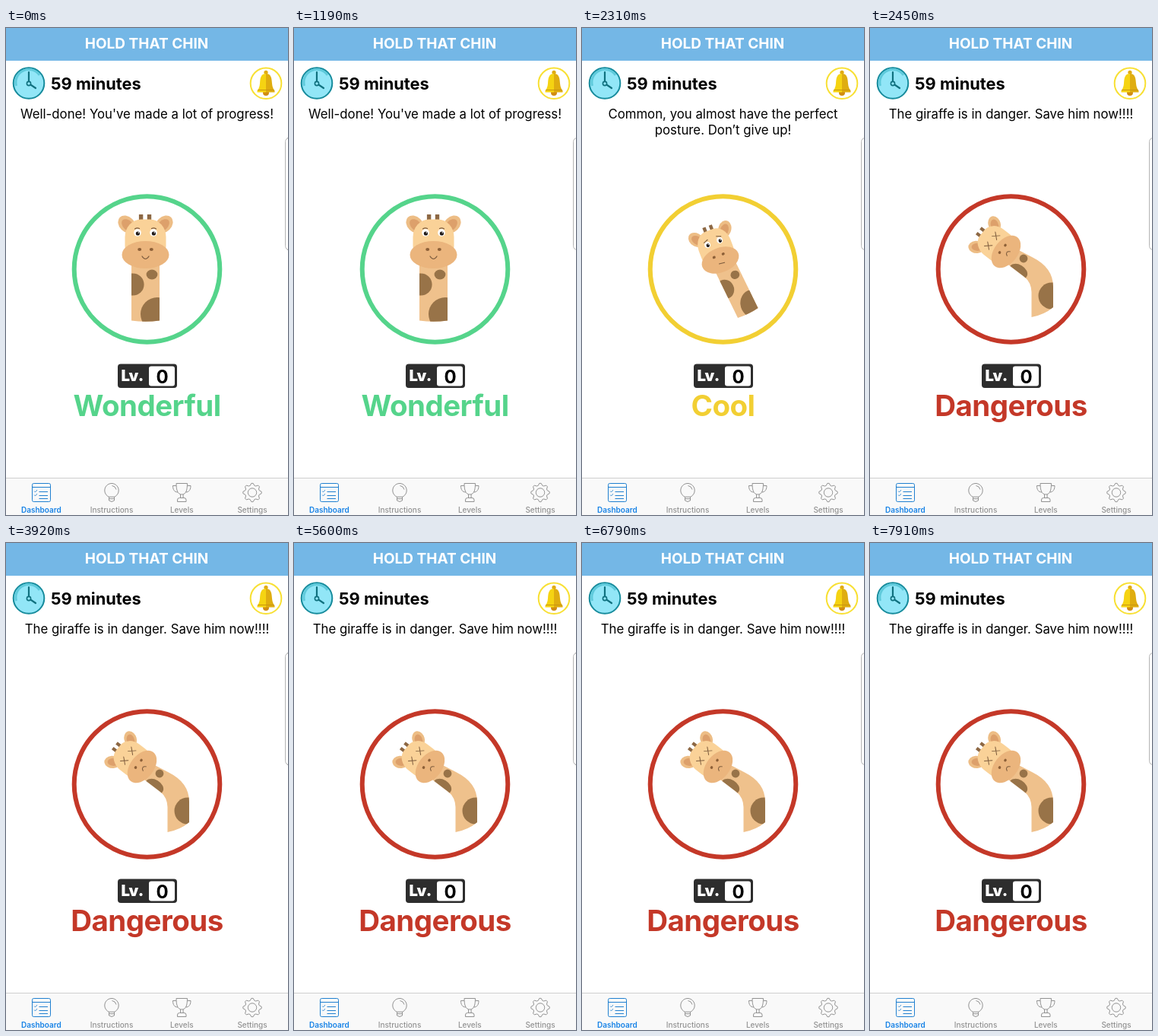
An HTML page that plays this animation: 371 by 640 pixels, repeating every 8 s.

```html
<!DOCTYPE html>
<html lang="en">
<head>
<meta charset="utf-8">
<title>Posture app</title>
<style>
html, body { margin: 0; width: 100%; height: 100%; overflow: hidden; background: #fff; }
svg { display: block; width: 371px; height: 640px; font-family: Inter, sans-serif; }
text { text-anchor: middle; }
.start { text-anchor: start; }
.title { font-size: 19px; font-weight: 700; fill: #fff; }
.time { font-size: 21.8px; font-weight: 700; }
.message { font-size: 16.8px; fill: #000; }
.rating { font-size: 38.5px; font-weight: 700; letter-spacing: -.014em; fill: var(--tone); }
.ring { fill: none; stroke: var(--tone); stroke-width: 6; }
.tabs text { font-size: 10px; font-weight: 500; fill: #929292; }
.tabs .on text { fill: #1682e6; font-weight: 600; }
.icon { fill: none; stroke: #929292; stroke-width: 1; stroke-linejoin: round; }
.on .icon { stroke: #2080d0; }
.line { fill: none; stroke: #7b5a3c; stroke-width: 1.2; stroke-linecap: round; }

.state { visibility: hidden; animation: 8s step-end infinite; }
#wonderful { --tone: #55d48b; animation-name: wonderful; }
#cool { --tone: #f2cf33; animation-name: cool; }
#dangerous { --tone: #c43828; animation-name: dangerous; }
@keyframes wonderful {
  0% { visibility: visible; }
  16.625%, 100% { visibility: hidden; }
}
@keyframes cool {
  0%, 30.625%, 84.875%, 100% { visibility: hidden; }
  16.625%, 72.625% { visibility: visible; }
}
@keyframes dangerous {
  0%, 72.625% { visibility: hidden; }
  30.625%, 84.875%, 100% { visibility: visible; }
}
</style>
</head>
<body>
<svg viewBox="0 0 371 640">
  <defs>
    <g id="ear">
      <ellipse rx="13" ry="10" transform="translate(-24.5 -40) rotate(45)" fill="#edbd85"/>
      <ellipse rx="10" ry="6.3" transform="translate(-23 -38.5) rotate(45)" fill="#dda06b"/>
    </g>
    <g id="head">
      <use href="#ear"/>
      <use href="#ear" transform="scale(-1 1)"/>
      <path d="M-8.6-53h5.4v13h-5.4zM2.3-53h5.4v13H2.3z" fill="#8d6844"/>
      <rect x="-27" y="-46.5" width="54" height="58" rx="21" ry="23" fill="#fad298"/>
      <ellipse rx="31" ry="18" fill="#ebb57d"/>
      <g fill="#8d6038">
        <ellipse cx="-7.8" cy="-7" rx="2.5" ry="2"/>
        <ellipse cx="7.8" cy="-7" rx="2.5" ry="2"/>
      </g>
    </g>
    <g id="eye">
      <circle r="4.8" fill="#fff"/>
      <circle cx=".4" cy="1" r="2.6" fill="#1d1715"/>
      <circle cx="1.3" r=".8" fill="#fff"/>
    </g>
    <path id="cross" class="line" d="M-4.5-4.500l9 9m0-9l-9 9"/>
    <path id="neckShape" d="M-18.5-86V-.5Q0 2 18.5-.5V-86z"/>
    <path id="bentShape" d="M190 289L214 301.500Q241 315 241 340V367Q229 377 212.500 380V347Q212 334 203 327L182 311z"/>
    <clipPath id="neckClip"><use href="#neckShape"/></clipPath>
    <clipPath id="bentClip"><use href="#bentShape"/></clipPath>
    <g id="neck">
      <use href="#neckShape" fill="#efc18c"/>
      <g fill="#987348" clip-path="url(#neckClip)">
        <circle cx="-16.5" cy="-48" r="14.6"/>
        <ellipse cx="8.5" cy="-61" rx="7.4" ry="6.4"/>
        <circle cx="15.5" cy="-9" r="22"/>
      </g>
    </g>
  </defs>

  <rect width="371" height="640" fill="#fff"/>
  <rect width="371" height="43" fill="#74b7e6"/>
  <text class="title" x="185" y="27">HOLD THAT CHIN</text>

  <g id="clock">
    <circle cx="30" cy="72.5" r="20.3" fill="#92e6f7" stroke="#168b9c" stroke-width="2"/>
    <path d="M13.5 76A17 17 0 0 1 44 62" fill="none" stroke="#5fcadb" stroke-width="3"/>
    <path d="M30 58V73L39 79" fill="none" stroke="#10717f" stroke-width="2.2" stroke-linecap="round"/>
    <circle cx="30" cy="73" r="2.6" fill="#92e6f7" stroke="#10717f" stroke-width="1.6"/>
  </g>
  <text class="time start" x="59" y="81">59 minutes</text>

  <g id="bell">
    <circle cx="342" cy="72.8" r="20.3" fill="#fff" stroke="#f8e034" stroke-width="2"/>
    <circle cx="342" cy="58.3" r="2.6" fill="#e0ac10"/>
    <circle cx="342" cy="85" r="4" fill="#d18c12"/>
    <path d="M342 60C335 60 334.5 66 334 73Q333.5 79 330.5 82.5V84.5H342z" fill="#f5d312"/>
    <path d="M342 60C349 60 349.5 66 350 73Q350.5 79 353.5 82.5V84.5H342z" fill="#dfad10"/>
    <path d="M331 81.5H353" stroke="#c9950f" stroke-width="1"/>
  </g>

  <g class="state" id="wonderful">
    <text class="message" x="185.5" y="118.5">Well-done! You've made a lot of progress!</text>
    <circle class="ring" cx="185.5" cy="317" r="95.8"/>
    <use href="#neck" transform="translate(183.5 385)"/>
    <g transform="translate(183.5 298)">
      <use href="#head"/>
      <use href="#eye" x="-10.5" y="-29"/>
      <use href="#eye" x="10.5" y="-29"/>
      <path class="line" d="M-14-34q3-2 6-.5M14-34q-3-2-6-.5M-4.500 2q4.500 7 9 0"/>
    </g>
    <text class="rating" x="185.500" y="510">Wonderful</text>
  </g>

  <g class="state" id="cool">
    <text class="message" x="185.5" y="118.5">Common, you almost have the perfect</text>
    <text class="message" x="185.5" y="140">posture. Don’t give up!</text>
    <circle class="ring" cx="185.5" cy="317" r="95.8"/>
    <use href="#neck" transform="translate(218.500 375) rotate(-26) scale(.8 .87)"/>
    <g transform="translate(182 305) rotate(-21) scale(.82 .9)">
      <use href="#head"/>
      <use href="#eye" x="-10.5" y="-27.500"/>
      <use href="#eye" x="10.5" y="-27.500"/>
      <path class="line" d="M-14.500-32l7-2.500M14.500-32l-7-2.500M-4 4.500l9 1"/>
    </g>
    <text class="rating" x="185.5" y="510">Cool</text>
  </g>

  <g class="state" id="dangerous">
    <text class="message" x="185.5" y="118.5">The giraffe is in danger. Save him now!!!!</text>
    <circle class="ring" cx="185.5" cy="317" r="95.8"/>
    <use href="#bentShape" fill="#efc18c"/>
    <g fill="#987348" clip-path="url(#bentClip)">
      <circle cx="202" cy="303" r="5.4"/>
      <ellipse cx="195" cy="320" rx="13" ry="9" transform="rotate(30 195 320)"/>
      <circle cx="239" cy="352" r="17.5"/>
    </g>
    <g transform="translate(179 294) rotate(-52) scale(.78 .86)">
      <use href="#head"/>
      <use href="#cross" x="-10.5" y="-27"/>
      <use href="#cross" x="10.5" y="-27"/>
      <path class="line" d="M-4.500 5q4.500-7 9 0"/>
    </g>
    <text class="rating" x="185.5" y="510">Dangerous</text>
  </g>

  <g id="level">
    <rect x="147" y="441.5" width="78" height="31.5" rx="4" fill="#2d2d2d"/>
    <rect x="188" y="444.5" width="34" height="26" rx="3" fill="#fff"/>
    <text class="start" x="151.5" y="464" font-size="20.3" font-weight="900" fill="#fff">Lv.</text>
    <text x="205.5" y="467" font-size="24" font-weight="700">0</text>
  </g>

  <rect x="367.5" y="144.5" width="20" height="147" rx="5" fill="#fff" stroke="#b4b4b4"/>
  <path id="corners" d="M370 144h1v1h-1zM370 291h1v1h-1z" fill="#a8a8a8"/>

  <g class="tabs">
    <rect y="591" width="371" height="49" fill="#f9f9f9"/>
    <rect y="591" width="371" height="1" fill="#cfcfcf"/>
    <g class="on">
      <g class="icon">
        <rect x="34.5" y="598.5" width="24" height="24" rx="2"/>
        <path d="M34.500 603.500h24M43.500 609.500h11.500M43.500 614.500h11.500M43.500 618.500h11.500"/>
        <path d="M37 608.500l1.500 1.500 2.500-3M37 613.500l1.500 1.500 2.500-3" stroke-width=".8"/>
      </g>
      <text x="46.3" y="636.5">Dashboard</text>
    </g>
    <g>
      <g class="icon">
        <path d="M135.500 616.200A9.200 9.200 0 1 1 142.500 616.200V621q-3.500 3-7 0z"/>
        <path d="M135.500 616.200h7M135.500 618.700h7M139.500 601.500q4.500.5 5.500 5"/>
      </g>
      <text x="139" y="636.5">Instructions</text>
    </g>
    <g>
      <g class="icon">
        <path d="M224 598.500h14.500C238.500 607 237 613 231.300 613S224 607 224 598.500z"/>
        <path d="M224 601.500h-4.500c0 5 2 8.500 6.500 8.500M238.500 601.500h4.500c0 5-2 8.500-6.500 8.500"/>
        <path d="M229.500 613v4.500h3.600V613M225.500 622.500v-2.500q0-2.500 3-2.500h5.500q3 0 3 2.500v2.500z"/>
      </g>
      <text x="231.3" y="636.5">Levels</text>
    </g>
    <g>
      <g class="icon" transform="translate(324 610.500)">
        <polygon id="gear"/>
        <circle r="5.7"/>
      </g>
      <text x="324" y="636.5">Settings</text>
    </g>
  </g>
</svg>
<script>
const LOOP = 8000, PERIOD = 560, FLASH = 70;

// Eight teeth, each with two outer and two inner points.
const teeth = Array.from({ length: 32 }, (_, i) => {
  const angle = (i - .5) * Math.PI / 16;
  const radius = i % 4 < 2 ? 12.2 : 9.6;
  return [radius * Math.cos(angle), radius * Math.sin(angle)].map(v => v.toFixed(2)).join();
});
document.getElementById('gear').setAttribute('points', teeth.join(' '));

const frames = [];
for (let start = 0; start < LOOP; start += PERIOD) {
  frames.push({ offset: start / LOOP, opacity: 1, easing: 'step-end' });
  frames.push({ offset: (start + FLASH) / LOOP, opacity: 0, easing: 'step-end' });
}
frames.push({ offset: 1, opacity: 0 });
document.getElementById('corners').animate(frames, { duration: LOOP, iterations: Infinity });
</script>
</body>
</html>
```
